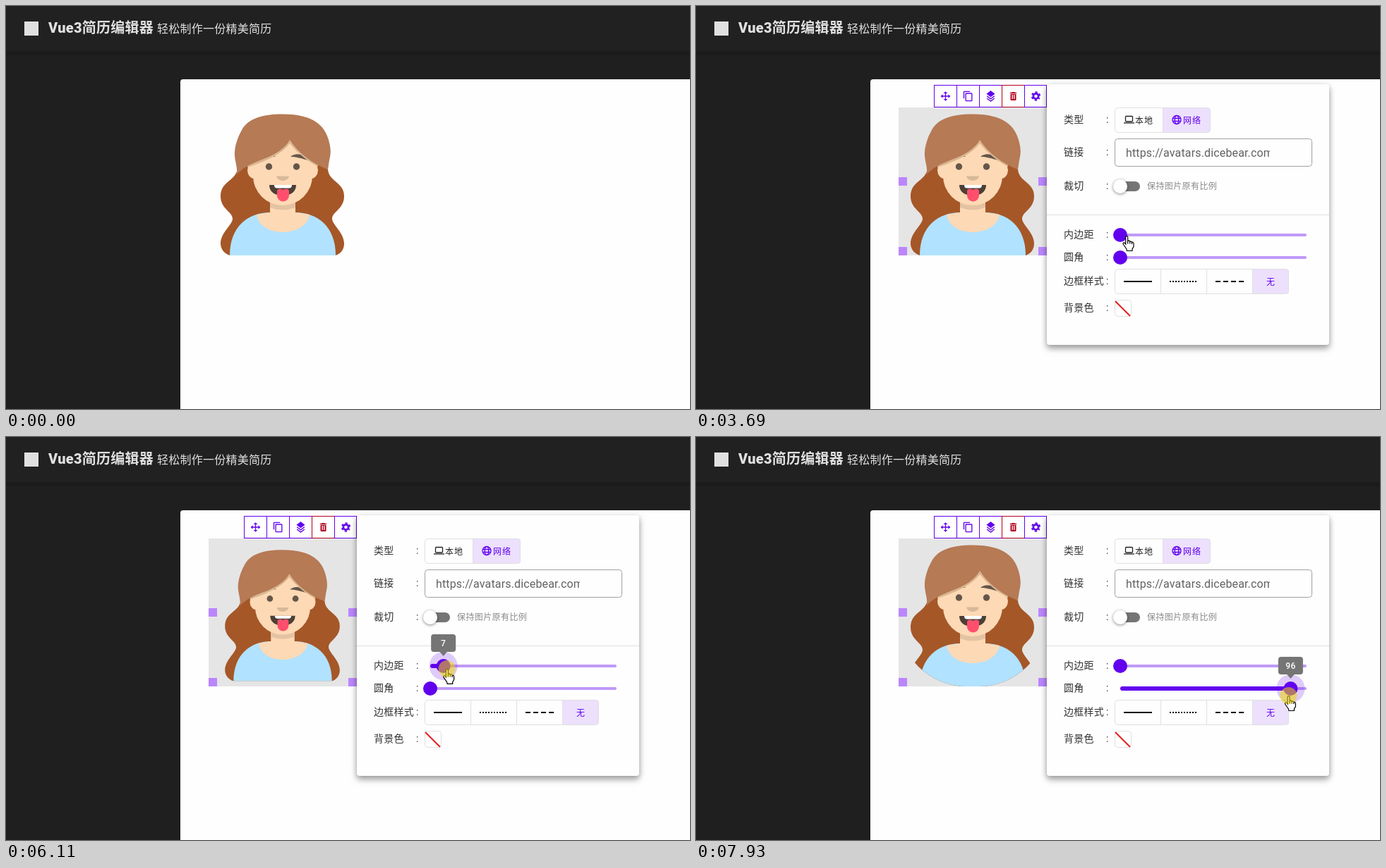
Recreate the animation shown at these times as an HTML page. Size 969 px wide and 572 px high, loop 8 s.

```html
<!DOCTYPE html>
<html lang="zh-CN">
<head>
<meta charset="utf-8">
<style>
  html, body { margin: 0; width: 100%; height: 100%; overflow: hidden; background: #1f1f1f; }
  svg { display: block; }
  text { font: 14px Roboto, "Noto Sans CJK SC", "Noto Sans CJK", sans-serif; letter-spacing: .25px; fill: #333; }
  .title { font-size: 20px; font-weight: 900; fill: #e0e0e0; }
  .sub { font-size: 16px; fill: #e0e0e0; }
  .btn { font-size: 12px; letter-spacing: 1.07px; fill: #222; }
  .on { fill: #6200ee; }
  .hint { font-size: 12px; letter-spacing: .4px; fill: #8a8a8a; }
  .link { font-size: 16px; letter-spacing: .15px; fill: #616161; }
  .value { font-size: 12px; font-weight: 500; letter-spacing: .4px; fill: #fff; text-anchor: middle; }
  .box { fill: none; stroke: #e0e0e0; }
  .sheet { filter: drop-shadow(0 5px 4px #0004) drop-shadow(0 2px 4px #0003); }
  .knob { filter: drop-shadow(0 1px 2px #0007); }
</style>
</head>
<body>
<svg width="969" height="572" viewBox="0 0 969 572">
  <defs>
    <clipPath id="round"><rect id="corner" x="287" y="144" width="210" height="210"/></clipPath>
    <clipPath id="field"><rect x="609" y="190" width="204" height="36"/></clipPath>
  </defs>

  <rect width="969" height="572" fill="#1f1f1f"/>
  <rect y="64" width="969" height="6" fill="#1b1b1b"/>
  <rect width="969" height="64" fill="#212121"/>
  <rect x="26" y="22" width="20" height="20" fill="#e0e0e0"/>
  <text class="title" x="60" y="38">Vue3简历编辑器</text>
  <text class="sub" x="214" y="38">轻松制作一份精美简历</text>
  <rect x="247" y="104" width="740" height="500" rx="4" fill="#fefefe"/>

  <rect id="shade" x="287" y="144" width="210" height="210" fill="#e5e5e5"/>
  <g id="avatar" clip-path="url(#round)">
    <path fill="#a55728" d="M327 235C322 249 304 250 304 270C304 288 321 292 321 302C321 310 304 322 304 337C304 345 309 351 317 354H467C475 351 479 345 479 337C479 322 462 310 462 302C462 292 479 288 479 270C479 250 457 249 456 232L392 180Z"/>
    <path fill="#b1e2ff" d="M317 354C317 312 344 293 374 293H410C440 293 467 312 467 354Z"/>
    <g fill="#fdd9b5">
      <path d="M355 296C358 312 373 321 392 321S427 312 430 296L410 293V270H374V293Z"/>
      <path fill="#e3c3a3" d="M374 275H410V286Q392 293 374 286Z"/>
      <ellipse cx="352" cy="233" rx="10" ry="12"/>
      <ellipse cx="432" cy="233" rx="10" ry="12"/>
      <path d="M343 222L402 185L441 220L434 241A42 42 0 0 1 350 241Z"/>
    </g>
    <g fill="#65564a">
      <circle cx="372.5" cy="228" r="4.7"/><circle cx="411.5" cy="228" r="4.7"/>
      <path d="M358 218C365 210 378 209 382 214C374 213 367 215 358 218ZM403 214C410 208 421 209 428 219C418 216 410 214 403 214Z"/>
    </g>
    <path fill="#d7b999" d="M383 241.5H401C399 250 385 250 383 241.5Z"/>
    <path fill="#4c3f36" d="M373 254H411C411 264 403 269 392 269S373 264 373 254Z"/>
    <path fill="#fff" d="M380 254H405Q405 258.5 401 258.5H384Q380 258.5 380 254Z"/>
    <path fill="#ff4f6d" d="M384 263Q384 259.500 388 259.500Q391 259.500 392.500 261Q394 259.500 397 259.500Q401 259.500 401 263V269A8.500 8.500 0 0 1 384 269Z"/>
    <path fill="#d9b690" d="M342 229C370 220 392 209 402 195C412 208 428 221 442 228V222L402 186L342 222Z"/>
    <path fill="#b67a55" d="M392 153.500C438 153.500 452 172 457 190C461 204 460 211 458 219L456 232C435 224 415 210 402 190C396 202 380 212 360 219C345 225 335 230 327 239C328 229 325 223 324 213C323 200 329 185 333 178C341 161 360 153.500 392 153.500Z"/>
  </g>
  <path id="grips" fill="#bb86fc" d="M287 243h12v12h-12zM485 243h12v12h-12zM287 342h12v12h-12zM485 342h12v12h-12z"/>

  <g id="tools"></g>

  <g id="tip">
    <rect x="437" y="70" width="88" height="32" rx="4" fill="#383838"/>
    <text x="452.500" y="90" style="fill:#fff">配置面板</text>
  </g>

  <g id="panel">
    <rect class="sheet" x="497" y="111" width="400" height="370" rx="4" fill="#fefefe"/>
    <g id="labels"></g>
    <path fill="#ece0fd" d="M661 144.500h64a4 4 0 0 1 4 4v27a4 4 0 0 1-4 4h-64zM788 373.500h48a4 4 0 0 1 4 4v27a4 4 0 0 1-4 4h-48z"/>
    <rect class="box" x="593.500" y="144.500" width="135" height="35" rx="4"/>
    <path class="box" d="M661.500 145v34"/>
    <g fill="none" stroke="#222" stroke-width="1.300"><rect x="608.500" y="156.500" width="10" height="7.500" rx="1"/><path d="M606 166H621"/></g>
    <g fill="none" stroke="#6200ee" stroke-width="1.300"><circle cx="681" cy="161.500" r="6"/><ellipse cx="681" cy="161.500" rx="2.700" ry="6"/><path d="M675.500 159.500h11M675.500 163.500h11"/></g>
    <text class="btn" x="622" y="167">本地</text>
    <text class="btn on" x="690" y="167">网络</text>

    <rect id="input" x="593.500" y="188.500" width="279" height="39" rx="4" fill="none"/>
    <text class="link" x="609" y="214" clip-path="url(#field)">https://avatars.dicebear.com</text>

    <rect x="597" y="249" width="32" height="14" rx="7" fill="#757575"/>
    <circle class="knob" cx="601" cy="256" r="10" fill="#fff"/>
    <text class="hint" x="639" y="260">保持图片原有比例</text>
    <path stroke="#e0e0e0" d="M497 296.500H897"/>

    <rect class="box" x="593.500" y="373.500" width="246" height="35" rx="4"/>
    <path class="box" d="M658.500 374v34M723.500 374v34M788.500 374v34"/>
    <g stroke="#000" stroke-width="2">
      <path d="M606 391h40"/>
      <path d="M671 391h40" stroke-dasharray="2"/>
      <path d="M736 391h40" stroke-dasharray="7 4"/>
    </g>
    <text class="btn on" x="808" y="396">无</text>
    <rect class="box" x="593.500" y="417.500" width="23" height="23" rx="4"/>
    <path stroke="#e51c1c" stroke-width="2" d="M594 419L615 440"/>
    <g id="sliders"></g>
  </g>

  <g id="mouse">
    <path id="arrow" fill="#fff" stroke="#000" d="M.5 .5V17L4.300 13.500L7 20L9.500 19L7 12.500H12Z"/>
    <g id="hand" transform="translate(-6.500)" fill="#fff" stroke="#000" stroke-width="1.200">
      <path d="M6.500 19L2 12.500C.5 10.500 2.500 9 4 10.500L5.200 12V2.200A1.500 1.500 0 0 1 8.200 2.200V7.500Q10.500 6.500 11.200 8.300Q13.300 7.500 14 9.300Q16.500 8.800 16.500 11.500V15.500L14.500 19V21.500H7Z"/>
      <path d="M8.200 7.500V11.500M11.200 8.500V11.500M14 9.500V12"/>
    </g>
    <circle id="press" r="12" fill="#f0d700" opacity=".55"/>
  </g>
</svg>

<script>
const $ = id => document.getElementById(id);
const set = (el, attrs) => { for (const k in attrs) el.setAttribute(k, attrs[k]); };
const show = (id, on) => $(id).style.display = on ? '' : 'none';
const clamp = (v, lo, hi) => Math.max(lo, Math.min(hi, v));

// Toolbar icons on a 24-unit grid
const icons = [
  '<path d="M13 6V11H18V7.750L22.250 12L18 16.250V13H13V18H16.250L12 22.250L7.750 18H11V13H6V16.250L1.750 12L6 7.750V11H11V6H7.750L12 1.750L16.250 6Z"/>',
  '<g fill="none" stroke="#6200ee" stroke-width="2"><rect x="7" y="6" width="13" height="16" rx="1"/><path d="M3 17V3Q3 2 4 2H16"/></g>',
  '<path d="M12 0L3 7L12 14L21 7Z"/><path d="M4 11.500L12 17.700L20 11.500M4 16.500L12 22.700L20 16.500" fill="none" stroke="#6200ee" stroke-width="2"/>',
  '<path fill-rule="evenodd" d="M19 4H15.500L14.500 3H9.500L8.500 4H5V6H19ZM6 7H18V19Q18 21 16 21H8Q6 21 6 19ZM9 9V18H11V9ZM13 9V18H15V9Z"/>',
  '<g fill="none" stroke="#6200ee"><circle cx="12" cy="12" r="5.500" stroke-width="4"/><circle cx="12" cy="12" r="8.500" stroke-width="3" stroke-dasharray="4.450" stroke-dashoffset="2.225" transform="rotate(30 12 12)"/></g>'
];
$('tools').innerHTML = icons.map((icon, i) => {
  const x = 337 + 32 * i, color = i == 3 ? '#b00020' : '#6200ee';
  return `<rect x="${x + .5}" y="112.5" width="${i < 4 ? 32 : 31}" height="31" fill="#fff" stroke="${color}"/>
    <g transform="translate(${x + 8.5} 120) scale(.667)" fill="${color}">${icon}</g>`;
}).join('');

const labels = { 类型: 166, 链接: 212, 裁切: 260, 内边距: 329, 圆角: 361, 边框样式: 395, 背景色: 433 };
$('labels').innerHTML = Object.entries(labels).map(([name, y]) =>
  `<text x="521" y="${y}">${name}</text><text x="581" y="${y}">:</text>`).join('');

const sliders = [325, 357].map(y => {
  const g = document.createElementNS('http://www.w3.org/2000/svg', 'g');
  set(g, { transform: `translate(601 ${y})` });
  g.innerHTML = `<rect y="-2" width="264" height="4" rx="2" fill="#bf99f8"/>
    <rect y="-3" height="6" rx="3" fill="#6200ee"/>
    <g><circle r="20" fill="#6200ee"/><circle r="10" fill="#6200ee"/>
    <g><path fill="#757575" d="M-6 -21H6L0 -14Z"/><rect x="-17.500" y="-45" width="35" height="25" rx="4" fill="#757575"/>
    <text class="value" y="-28"></text></g></g>`;
  $('sliders').append(g);
  const [, fill, thumb] = g.children, [halo, , tag] = thumb.children;
  return (value, glow, tagged) => {
    const x = value * 264 / 105;
    set(fill, { width: x });
    set(thumb, { transform: `translate(${x})` });
    set(halo, { opacity: glow });
    tag.style.display = tagged ? '' : 'none';
    tag.lastElementChild.textContent = Math.round(value);
  };
});

// Pointer path: time, x, y, power (positive eases in, negative eases out, none is smooth)
const path = [
  [260, 892, 600], [1100, 446, 218, -2], [1500, 446, 218], [1900, 479, 118],
  [2640, 479, 118], [2990, 632, 196], [3450, 614, 334], [3690, 610, 326],
  [4100, 610, 326], [4240, 606, 326], [4360, 606, 326], [4940, 701.5, 333],
  [5320, 701.5, 333], [5720, 643.7, 331, -2], [5950, 643.7, 331], [6430, 571, 323],
  [6510, 571, 323], [6900, 596, 354], [7040, 596, 354], [7930, 839.4, 367, 1.15]
];
function pointer(t) {
  const i = path.findIndex(k => k[0] > t);
  if (i < 1) return path.at(i).slice(1, 3);
  const [t0, x0, y0] = path[i - 1], [t1, x1, y1, pow] = path[i];
  const p = (t - t0) / (t1 - t0);
  const e = !pow ? p * p * (3 - 2 * p) : pow > 0 ? p ** pow : 1 - (1 - p) ** -pow;
  return [x0 + (x1 - x0) * e, y0 + (y1 - y0) * e];
}

function draw(t) {
  const [x, y] = pointer(t);
  const within = (a, b) => t >= a && t < b;
  const drag = from => clamp((x - from) * 105 / 264, 0, 105);

  const pad = within(4400, 6510) ? drag(606) : 0;
  const radius = t >= 7040 ? drag(598) : 0;
  set($('avatar'), { transform: `translate(392 249) scale(${1 - pad / 105}) translate(-392 -249)` });
  set($('corner'), { rx: radius });

  const hover = t > 1340 || (t > 300 && x < 497 && y < 354);
  show('shade', hover);
  show('grips', hover);
  show('tools', t >= 1260);
  show('tip', within(1820, 2760));
  $('tip').style.opacity = clamp(Math.min((t - 1800) / 100, (2760 - t) / 100), 0, 1);

  const open = 1 - (1 - clamp((t - 2360) / 225, 0, 1)) ** 3;
  show('panel', open > 0);
  set($('panel'), { opacity: open, transform: `translate(497 111) scale(${.5 + open / 2}) translate(-497 -111)` });
  set($('input'), { stroke: x > 593 && y > 188 && y < 228 && within(2640, 3690) ? '#333' : '#a0a0a0' });

  const held = within(4400, 6510), first = within(4400, 7060), second = t >= 7060;
  sliders[0](pad, first ? (held ? .2 : .14) : 0, first);
  sliders[1](radius, second ? .2 : t > 6800 ? .05 : 0, second);

  const hand = t > 1580 && (y < 144 || y > 310);
  show('mouse', t >= 300);
  set($('mouse'), { transform: `translate(${x} ${y})` });
  show('hand', hand);
  show('arrow', !hand);
  show('press', within(1260, 1340) || within(2200, 2360) || held || t >= 7040);
}

const start = performance.now();
function tick() {
  draw((performance.now() - start) % 8000);
  requestAnimationFrame(tick);
}
tick();
</script>
</body>
</html>
```
